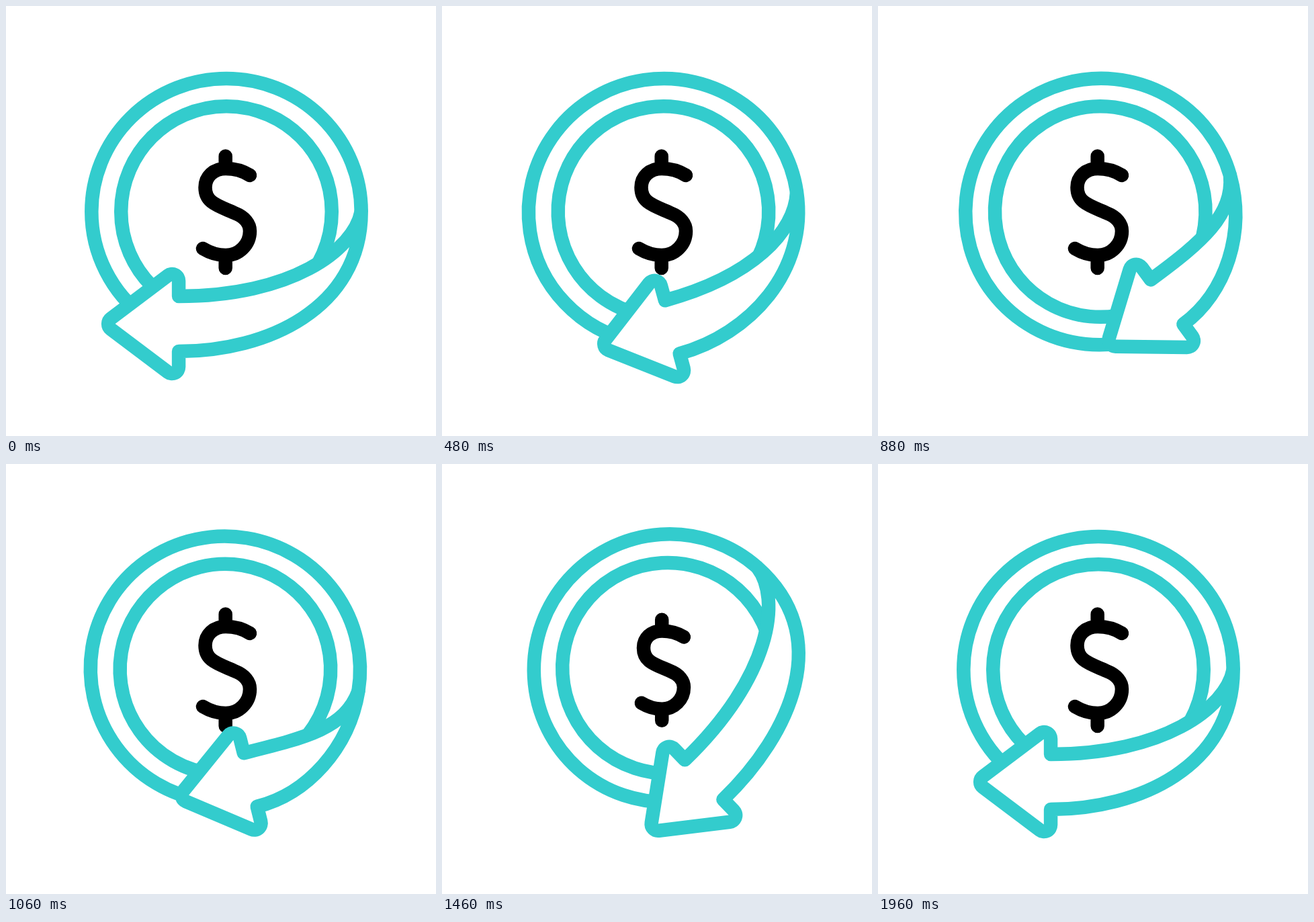
Write an HTML page with a canvas that moves like this. It is 640x640 px and loops after 2 s.

```html
<!DOCTYPE html>
<html lang="en">
<head>
<meta charset="utf-8">
<title>Cashback</title>
<style>
  html, body { margin: 0; width: 100%; height: 100%; overflow: hidden; background: #fff; }
  canvas { display: block; width: 640px; height: 640px; }
</style>
</head>
<body>
<canvas id="stage" width="640" height="640"></canvas>
<script>
const ctx = document.getElementById('stage').getContext('2d');
const LOOP = 2000;
const TEAL = '#33cccd';
const LINE = 20.5;
const RAD = Math.PI / 180;
const PIVOT = { x: 329.5, y: 296 };
const RING = { x: -1.5, y: 10, rx: 200.7, ry: 198, inner: 156.8 };

const clamp01 = v => Math.min(1, Math.max(0, v));
const sineInOut = p => (1 - Math.cos(Math.PI * p)) / 2;
const cubicInOut = p => p < 0.5 ? 4 * p ** 3 : 1 - 4 * (1 - p) ** 3;

// Wind up backwards, then one full clockwise turn.
function spin(t) {
  if (t < 820) return -16 * sineInOut(clamp01((t - 120) / 700));
  return -16 + 376 * cubicInOut(clamp01((t - 820) / 940));
}

// Arrowhead on the ring: time, then polar angle, distance from the centre and tilt.
const REACH = [
  [120, 113, 181.5, 0],
  [660, 82.2, 167.5, -12],
  [1060, 67.8, 168.6, -23.4],
  [1300, 113.1, 170.9, -0.9],
  [1640, 120.2, 178.7, 5.9],
  [1960, 113, 181.5, 0]
];
const SCALE = [[1060, 1], [1300, 0.72], [1640, 1.115], [1960, 1]];

// Cubic Hermite interpolation; flat keys come to rest at every key.
function sample(keys, t, flat) {
  const last = keys.length - 1;
  if (t <= keys[0][0]) return keys[0].slice(1);
  if (t >= keys[last][0]) return keys[last].slice(1);
  const i = keys.findIndex(key => key[0] > t) - 1;
  const [t0, ...from] = keys[i], [t1, ...to] = keys[i + 1];
  const span = t1 - t0, p = (t - t0) / span, q = 1 - p;
  const slope = (k, n) => flat || k === 0 || k === last ? 0
    : (keys[k + 1][n] - keys[k - 1][n]) / (keys[k + 1][0] - keys[k - 1][0]);
  return from.map((v, n) =>
    v * (1 + 2 * p) * q * q + to[n] * p * p * (3 - 2 * p) +
    span * p * q * (slope(i, n + 1) * q - slope(i + 1, n + 1) * p));
}

function drawDollar(scale) {
  const cx = 332, cy = 307;
  ctx.save();
  ctx.beginPath();
  ctx.translate(cx, cy);
  ctx.scale(scale, scale);
  ctx.translate(-cx, -cy);
  ctx.moveTo(363, 252);
  ctx.bezierCurveTo(352, 245, 340, 242, 327, 242);
  ctx.bezierCurveTo(309, 242, 296.5, 254, 296.5, 270);
  ctx.bezierCurveTo(296.5, 293, 315, 297, 341, 308.5);
  ctx.bezierCurveTo(355, 314, 363, 324, 363, 335);
  ctx.bezierCurveTo(363, 355, 347, 371, 327, 371);
  ctx.bezierCurveTo(313, 371, 303, 367, 293, 361);
  ctx.moveTo(326.7, 223.5);
  ctx.lineTo(326.7, 242);
  ctx.moveTo(326.7, 371);
  ctx.lineTo(326.7, 390);
  ctx.restore();
  // The line keeps its weight while the sign scales.
  ctx.strokeStyle = '#000';
  ctx.lineCap = 'round';
  ctx.stroke();
}

function drawArrow(polar, radius, tilt) {
  const cos = Math.cos(tilt * RAD), sin = Math.sin(tilt * RAD);
  const hx = RING.x + radius * Math.cos(polar * RAD);
  const hy = RING.y + radius * Math.sin(polar * RAD);
  const head = (x, y) => [hx + x * cos - y * sin, hy + x * sin + y * cos];
  const ringAngle = ([x, y]) => Math.atan2(y - RING.y, x - RING.x);

  const tail = [RING.x + RING.rx, RING.y];
  const top = head(0, -84), tip = head(-111.6, 0), bottom = head(0, 84);
  const innerCorner = head(0, -41), outerCorner = head(0, 41);
  const end = ringAngle(head(-55, 0));

  ctx.strokeStyle = TEAL;
  ctx.lineCap = 'butt';
  ctx.beginPath();
  ctx.ellipse(RING.x, RING.y, RING.rx, RING.ry, 0, 0, end, true);
  ctx.stroke();
  ctx.beginPath();
  ctx.arc(RING.x, RING.y, RING.inner, 45 * RAD, end, true);
  ctx.stroke();

  // Handle lengths follow from the angle each edge spans; the outer one hugs the ring.
  const innerPull = 80 * ringAngle(innerCorner);
  const outerPull = 4 / 3 * Math.tan(ringAngle(outerCorner) / 4) * RING.rx;

  ctx.beginPath();
  ctx.moveTo(...tail);
  ctx.bezierCurveTo(tail[0] - 11, tail[1] + 58, ...head(innerPull, -41), ...innerCorner);
  ctx.arcTo(...top, ...tip, 10);
  ctx.arcTo(...tip, ...bottom, 10);
  ctx.arcTo(...bottom, ...outerCorner, 10);
  ctx.lineTo(...outerCorner);
  ctx.bezierCurveTo(...head(outerPull * 0.95, 41), tail[0], tail[1] + outerPull * 1.05, ...tail);
  ctx.closePath();
  ctx.fillStyle = '#fff';
  ctx.fill();
  ctx.stroke();
}

function draw(t) {
  ctx.fillStyle = '#fff';
  ctx.fillRect(0, 0, 640, 640);
  ctx.lineWidth = LINE;
  ctx.lineJoin = 'round';
  drawDollar(...sample(SCALE, t, true));
  ctx.save();
  ctx.translate(PIVOT.x, PIVOT.y);
  ctx.rotate(spin(t) * RAD);
  drawArrow(...sample(REACH, t, false));
  ctx.restore();
}

const start = performance.now();
function tick() {
  draw((performance.now() - start) % LOOP);
  requestAnimationFrame(tick);
}
tick();
</script>
</body>
</html>
```
